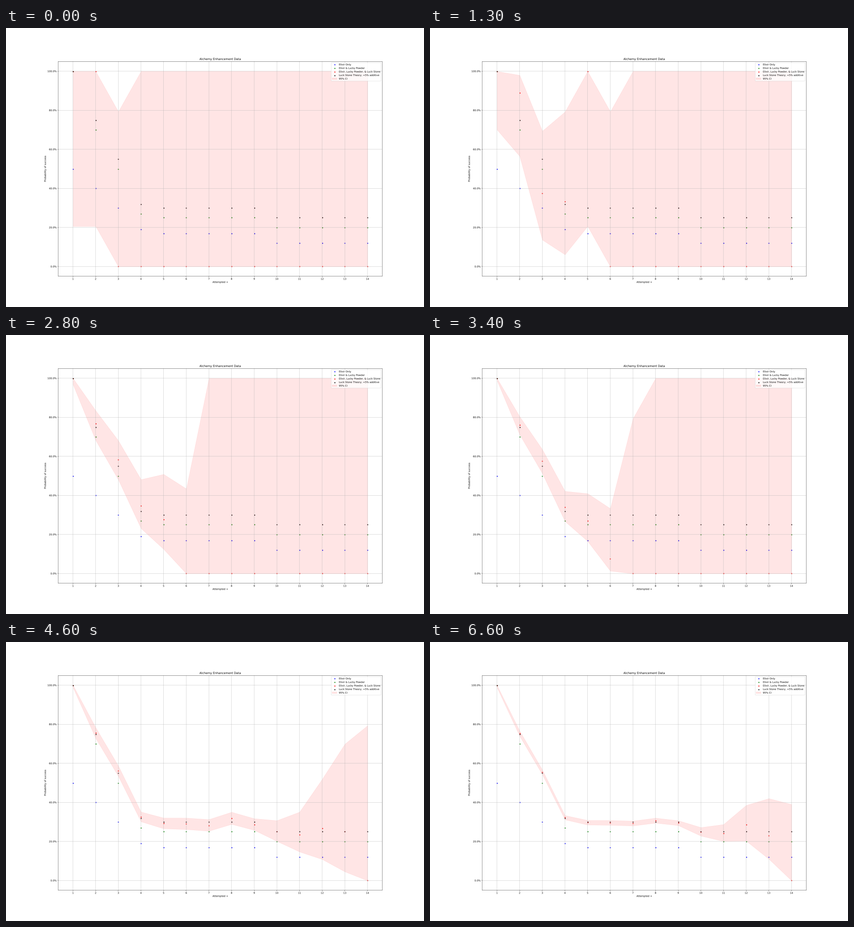
Recreate the animation shown at these times as a matplotlib script. Size 917 by 611 pixels, loop 7 s.

```python
import matplotlib.pyplot as plt
import numpy as np
from matplotlib.animation import FuncAnimation
from matplotlib.patheffects import Normal
from matplotlib.ticker import PercentFormatter

WIDTH, HEIGHT, DPI = 917, 611, 38.2
FRAMES, INTERVAL = 70, 100
Z = 1.96  # 95% confidence

plt.rcParams.update({
    "font.family": "DejaVu Sans",
    "text.hinting": "no_hinting",
    "path.snap": False,
    # Draws text and markers as paths, at fractions of a pixel.
    "path.effects": [Normal()],
})

levels = np.arange(1, 15)
elixir = np.array([50, 40, 30, 19] + [17] * 5 + [12] * 5) / 100
powder = np.array([100, 70, 50, 27] + [25] * 5 + [20] * 5) / 100
theory = np.minimum(powder + 0.05, 1)

# New items enter at level 1 until PHASE, then at each of BOUGHT levels.
PHASE, NEW_ITEMS = 34, 322
BOUGHT = range(2, 10)
BOUGHT_TIMES, BOUGHT_ITEMS = [PHASE, 40, 53, 60], [0, 190, 2400, 3550]

# Luck per level in standard deviations, for small and for large samples.
EARLY_LUCK = [0, 1.3, -1.9, -.5, .5, -2.4, -1, 0, 0, 1.5, 1.2, 0, .8, -1.5]
LATE_LUCK = [0, .5, .8, .5, -.5, -.6, -1.1, 1.2, -.8, 0, -.4, .7, -1, -1.5]
LUCK_FADE = 30


def successes(n, chance, early, late):
    if n == 0:
        return 0
    luck = late + (early - late) * np.exp(-n / LUCK_FADE)
    rate = chance + luck * np.sqrt(chance * (1 - chance) / n)
    return round(n * min(max(rate, 0), 1))


def tally(frame):
    """Attempts and successes per level; a success moves an item up."""
    bought = round(np.expm1(
        np.interp(frame, BOUGHT_TIMES, np.log1p(BOUGHT_ITEMS))))
    arriving = round(NEW_ITEMS ** min(frame / PHASE, 1))
    tries, wins = [], []
    for level, *odds in zip(levels, theory, EARLY_LUCK, LATE_LUCK):
        n = arriving + (bought if level in BOUGHT else 0)
        arriving = successes(n, *odds)
        tries.append(n)
        wins.append(arriving)
    return np.array(tries), np.array(wins)


def wilson(tries, wins):
    """Success rate with its Wilson score bounds; 0 to 1 without data."""
    n = np.maximum(tries, 1)
    p = wins / n
    scale = 1 + Z**2 / n
    center = (p + Z**2 / (2 * n)) / scale
    half = Z * np.sqrt(p * (1 - p) / n + Z**2 / (4 * n**2)) / scale
    low = np.where(tries > 0, center - half, 0)
    high = np.where(tries > 0, center + half, 1)
    return p, low, high


# The small margin keeps the canvas from being truncated by a pixel.
fig, ax = plt.subplots(
    figsize=((WIDTH + 0.001) / DPI, (HEIGHT + 0.001) / DPI), dpi=DPI)


def dots(values, color, label):
    return ax.scatter(levels, values, marker=".", color=color, label=label)


rate, low, high = wilson(*tally(0))
dots(elixir, "blue", "Elixir Only")
dots(powder, "green", "Elixir & Lucky Powder")
observed = dots(rate, "red", "Elixir, Lucky Powder, & Luck Stone")
dots(theory, "black", "Luck Stone Theory; +5% additive")
band = ax.fill_between(levels, low, high, color="red", alpha=0.1,
                       label="95% CI")

ax.set(title="Alchemy Enhancement Data", xlabel="Attempted +",
       ylabel="Probability of success", xticks=levels,
       xlim=(0.35, 14.65), ylim=(-0.05, 1.05))
ax.yaxis.set_major_formatter(PercentFormatter(1, decimals=1))
ax.grid()
ax.legend(loc="upper right", labelspacing=0.55)


def update(frame):
    rate, low, high = wilson(*tally(frame))
    observed.set_offsets(np.column_stack([levels, rate]))
    outline = np.column_stack([np.r_[levels, levels[::-1]],
                               np.r_[low, high[::-1]]])
    band.set_verts([outline])
    return observed, band


animation = FuncAnimation(fig, update, frames=FRAMES, interval=INTERVAL,
                          repeat=True, repeat_delay=0)
plt.show()
```
